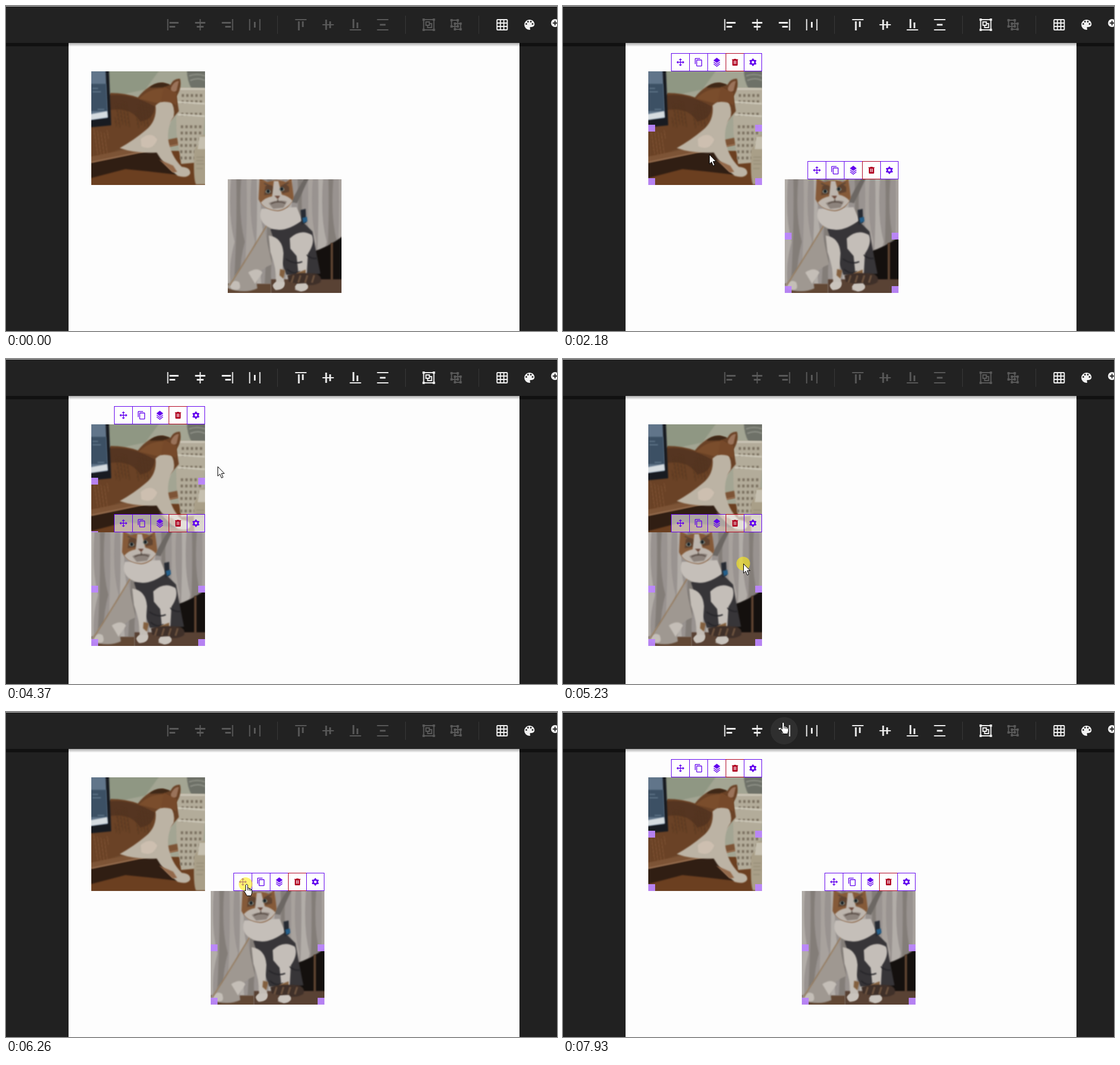
Recreate the animation shown at these times as an HTML page with a canvas. Size 969 by 572 pixels, loop 8000 ms.

```html
<!DOCTYPE html>
<html lang="en">
<head>
<meta charset="utf-8">
<title>Image alignment editor</title>
<style>
html, body { margin: 0; width: 100%; height: 100%; overflow: hidden; background: #212121; }
canvas { display: block; }
</style>
</head>
<body>
<canvas id="stage" width="969" height="572"></canvas>
<script>
const LOOP = 8000, W = 969, H = 572;
const PURPLE = '#6200ee', RED = '#b00020';
const ctx = document.getElementById('stage').getContext('2d');

// ---- icons on a 24 unit grid ----
const alignIcons = [
  'M2 2h2v20h-2zM6 7h16v3h-16zM6 14h10v3h-10z',
  'M11 2h2v5h8v3h-8v4h5v3h-5v5h-2v-5h-5v-3h5v-4h-8v-3h8z',
  'M20 2h2v20h-2zM2 7h16v3h-16zM8 14h10v3h-10z',
  'M2 2h2v20h-2zM20 2h2v20h-2zM10.5 7h3v10h-3z',
  'M2 2h20v2h-20zM7 6h3v16h-3zM14 6h3v10h-3z',
  'M22 11h-5v-5h-3v5h-4v-8h-3v8h-5v2h5v8h3v-8h4v5h3v-5h5z',
  'M2 20h20v2h-20zM7 2h3v16h-3zM14 8h3v10h-3z',
  'M2 2h20v2h-20zM7 10.5h10v3h-10zM2 20h20v2h-20z'
].map(d => new Path2D(d));
const alignX = [293, 341, 389, 437, 518, 566, 614, 662];

const groupIcon = new Path2D('M1 1V5H2V19H1V23H5V22H19V23H23V19H22V5H23V1H19V2H5V1zM5 4H19V5H20V19H19V20H5V19H4V5H5zM6 6V14H9V18H18V9H14V6zM8 8H12V12H8zM14 11H16V16H11V14H14z');
const ungroupIcon = new Path2D('M2 2H6V3H13V2H17V6H16V9H18V8H22V12H21V18H22V22H18V21H12V22H8V18H9V16H6V17H2V13H3V6H2zM18 12V11H16V13H17V17H13V16H11V18H12V19H18V18H19V12zM13 6V5H6V6H5V13H6V14H9V12H8V8H12V9H14V6zM12 12H11V14H13V13H14V11H12z');
const gridIcon = new Path2D('M4 2H20A2 2 0 0 1 22 4V20A2 2 0 0 1 20 22H4A2 2 0 0 1 2 20V4A2 2 0 0 1 4 2z');
for (let i = 0; i < 9; i++) gridIcon.rect(4 + i % 3 * 6, 4 + Math.floor(i / 3) * 6, 4, 4);

const paletteIcon = new Path2D('M12 3a9 9 0 0 0 0 18a1.5 1.5 0 0 0 1.5-1.5c0-.4-.15-.75-.4-1c-.2-.3-.37-.6-.37-1a1.5 1.5 0 0 1 1.5-1.5H16a5 5 0 0 0 5-5c0-4.4-4-8-9-8z');
for (const [x, y] of [[6.5, 10.5], [9.5, 6.5], [14.5, 6.5], [17.5, 10.5]]) addCircle(paletteIcon, x, y, 1.5);

const zoomIcon = new Path2D('M14 15.4l-.8-.8l1.4-1.4l.8.8H16l6 6l-2 2l-6-6zM8 5V8H5V10H8V13H10V10H13V8H10V5z');
addCircle(zoomIcon, 9, 9, 7);

const gearIcon = new Path2D();
for (let i = 0; i < 24; i++) {
  const a = (i - 1.5) * Math.PI / 12 + Math.PI / 6, r = i % 4 === 1 || i % 4 === 2 ? 10 : 7.4;
  gearIcon.lineTo(12 + r * Math.cos(a), 12 + r * Math.sin(a));
}
gearIcon.closePath();
addCircle(gearIcon, 12, 12, 3.5);

const toolIcons = [
  new Path2D('M13 6V11H18V7.75L22.25 12L18 16.25V13H13V18H16.25L12 22.25L7.75 18H11V13H6V16.25L1.75 12L6 7.75V11H11V6H7.75L12 1.75L16.25 6z'),
  new Path2D('M8 5H19a2 2 0 0 1 2 2V21a2 2 0 0 1-2 2H8a2 2 0 0 1-2-2V7a2 2 0 0 1 2-2zM8 7V21H19V7zM16 1H4a2 2 0 0 0-2 2V17H4V3H16z'),
  new Path2D('M12 0L3 7L12 14L21 7zM19.4 10.7L12 16.5L4.6 10.7L3 12L12 19L21 12zM19.4 15.7L12 21.5L4.6 15.7L3 17L12 24L21 17z'),
  new Path2D('M9 3V4H4V6H5V19a2 2 0 0 0 2 2H17a2 2 0 0 0 2-2V6H20V4H15V3zM9 8H11V17H9zM13 8H15V17H13z'),
  gearIcon
];
const arrow = new Path2D('M.5 .5V17L4.3 13.5L7 20.3L9.7 19.1L7 12.5H12z');
const hand = new Path2D('M.5 1.5Q2.2 -1.5 4 1.5V7Q6.3 5.8 6.8 8Q9 7 9.3 9Q11.5 8.5 11.5 11V15Q11 17.5 9.8 20.5H2.5Q1.5 17.5 -2.5 12Q-1 9.5 .5 12z');

function addCircle(path, x, y, r) {
  path.moveTo(x + r, y);
  path.arc(x, y, r, 0, 7);
}
function icon(path, cx, cy, color, size = 24) {
  ctx.save();
  ctx.translate(cx - size / 2, cy - size / 2);
  ctx.scale(size / 24, size / 24);
  ctx.fillStyle = color;
  ctx.fill(path, 'evenodd');
  ctx.restore();
}
function box(color, x, y, w, h) {
  ctx.fillStyle = color;
  ctx.fillRect(x, y, w, h);
}
function disc(color, x, y, r) {
  ctx.fillStyle = color;
  ctx.beginPath();
  ctx.arc(x, y, r, 0, 7);
  ctx.fill();
}

// ---- photos, painted once from soft flat shapes ----
function photo(base, paint) {
  const c = document.createElement('canvas');
  c.width = c.height = 200;
  const g = c.getContext('2d');
  g.fillStyle = base;
  g.fillRect(0, 0, 200, 200);
  g.filter = 'blur(.8px)';
  const fill = (color, d) => { g.fillStyle = color; g.fill(new Path2D(d)); };
  const line = (color, width, d) => {
    g.strokeStyle = color;
    g.lineWidth = width;
    g.stroke(new Path2D(d));
  };
  paint(fill, line);
  return c;
}

const lyingCat = photo('#a3a593', (fill, line) => {
  fill('#8f9783', 'M30 -5H122L95 32L33 45z');
  fill('#6e7168', 'M168 -5H205V30H176Q168 15 168 -5z');
  line('#92948a', 2, 'M172 8Q186 3 200 8M174 16Q188 10 200 16');
  fill('#6b3f20', 'M-5 140H205V205H-5z');
  fill('#301e13', 'M-5 160L125 134L152 182L100 176L60 172L-5 189z');
  fill('#7d5436', 'M-5 149L165 114V127L-5 162z');
  line('#9a7254', 2, 'M0 160L165 126');
  fill('#b3ac9a', 'M148 28L205 30L192 160L158 163L150 110z');
  for (let row = 0; row < 11; row++)
    for (let col = 0; col < 5; col++)
      if (row !== 2 && row !== 4)
        fill('#7c7261', `M${159 + col * 8 - row * .3} ${40 + row * 11}h4v5h-4z`);
  line('#cdc8b9', 3, 'M150 31H200M150 54L200 57M152 76L200 79');
  fill('#6a4226', 'M-5 92L34 38Q60 38 82 46Q100 22 126 20L139 24Q145 12 156 13Q160 28 150 44L154 70L130 98L84 132L-5 151z');
  fill('#553521', 'M33 42Q70 38 112 62Q110 85 86 88Q70 62 33 68z');
  fill('#7a4d2c', 'M84 48Q104 28 132 30L148 42L116 56z');
  fill('#3f2817', 'M102 29Q117 14 139 24L126 28z');
  fill('#9a735a', 'M140 29Q146 16 154 17L150 34L140 40z');
  for (let i = 0; i < 75; i++) {
    const x = 4 + i * 37 % 110, y = (x < 38 ? 102 : 52) + i * 29 % 40;
    line(i % 3 ? '#553621' : '#825637', 1, `M${x} ${y}q3 4 2 9`);
  }
  fill('#bcb3a4', 'M113 60Q124 50 138 50Q148 63 145 80Q134 95 135 118Q139 148 159 168Q175 169 174 180Q169 189 152 184Q126 163 115 143Q78 145 50 135Q75 121 95 104Q116 88 113 60z');
  fill('#cdbfb0', 'M87 119Q105 104 116 120Q108 141 88 132z');
  fill('#94694a', 'M119 155L144 166L151 177L143 178z');
  fill('#76492a', 'M128 28L150 38L150 60Q138 52 122 54z');
  fill('#181b21', 'M-5 -5H31L35 95L-5 99z');
  fill('#61758a', 'M-5 -5H25L29 82L-5 86z');
  fill('#3c5064', 'M-5 22H26L28 70H-5z');
  fill('#d6dce0', 'M-5 76L28 70L29 81L-5 86z');
  line('#819aac', 1, 'M2 30H12M2 36H17M11 67H23');
  fill('#a99f88', 'M181 140Q182 132 190 129V115Q194 111 205 112V199H184Q179 189 181 140z');
  fill('#c6c0b0', 'M190 115H205V137H187z');
  line('#8a816e', 1, 'M185 151H198M185 157H197M185 163H198M185 171H196');
});

const sittingCat = photo('#999390', (fill, line) => {
  for (let i = 0; i < 12; i++) {
    const x = i * 18 - 3;
    fill(['#b2ada8', '#837d78', '#a8a29d'][i % 3], `M${x} -5h9Q${x + 3} 65 ${x + 15} 110Q${x + 4} 150 ${x + 8} 184h-12Q${x + 2} 80 ${x} -5z`);
  }
  fill('#6c6763', 'M111 40L136 -5L144 -5L122 42z');
  fill('#14100e', 'M148 128Q178 119 205 98V182H148z');
  line('#5f4431', 4, 'M183 112V178');
  fill('#594234', 'M76 176H205V205H76z');
  fill('#624835', 'M-5 184H76V205H-5z');
  fill('#9f9891', 'M-5 192L25 154L64 88L78 150Q46 160 52 192Q29 203 -5 190z');
  fill('#c4beb7', 'M4 189Q8 174 20 181Q27 199 7 193zM36 164Q52 153 61 164L48 184z');
  line('#957a5c', 2, 'M70 79Q32 142 3 187');
  fill('#373538', 'M75 88L130 73L149 92L154 120L163 166Q130 172 103 168L85 119z');
  fill('#c5bfb9', 'M59 52Q51 75 75 86Q100 96 131 72L121 49z');
  fill('#c4beb7', 'M72 99Q96 102 98 130L96 160L100 183Q99 195 83 193Q77 189 85 180Q86 157 75 128z');
  fill('#c4beb8', 'M109 104Q128 86 148 98Q154 112 141 131L139 166L141 191Q132 201 118 194L125 174L121 135L110 122z');
  line('#252428', 2, 'M102 140Q117 151 131 145M139 133Q147 141 157 139M104 158Q116 169 127 162');
  fill('#83603f', 'M92 158L101 160L98 175L91 169zM121 165L137 159L137 175L121 177z');
  fill('#3f3029', 'M105 169Q122 163 154 166Q167 170 163 181Q149 192 107 180z');
  for (let i = 0; i < 4; i++) line('#705540', 3, `M${116 + i * 12} 169l-4 13`);
  fill('#c9c3bc', 'M79 187Q83 178 99 181Q102 194 84 195zM118 190Q120 182 138 183Q146 195 128 197z');
  fill('#855a39', 'M56 -2L70 5Q88 -2 102 5L112 -2L116 32Q108 54 88 56Q63 54 54 35z');
  fill('#5f4330', 'M66 12Q78 6 83 18L80 26L64 28zM93 12Q102 5 108 14L108 22L96 25z');
  fill('#bdb5ad', 'M81 3H89L95 27Q108 30 114 38Q104 53 88 55Q66 54 58 41Q66 32 78 30z');
  fill('#8d837c', 'M72 42Q88 35 104 39L98 50L80 52z');
  fill('#6d4a3c', 'M82 29H92L88 35z');
  line('#4d4039', 1.5, 'M88 35V40M76 43Q88 37 101 42M64 7L72 11M99 10L107 6');
  for (const [x, y] of [[71, 22], [95, 18]]) {
    fill('#8b9388', `M${x - 5} ${y}q5 -8 10 0q-5 6 -10 0z`);
    fill('#171c20', `M${x - 3} ${y - 1}q3 -7 6 0q-3 7 -6 0z`);
  }
  fill('#272b33', 'M128 54L137 52L138 76L130 80z');
  fill('#245e89', 'M131 68L139 66L140 74L133 77z');
});

// ---- motion: time, x, y of the pointer ----
const track = [
  [210, 818, 560], [520, 660, 476], [850, 500, 440], [1150, 500, 440], [1700, 248, 248],
  [2030, 248, 248], [2180, 257, 261], [2380, 257, 261], [2750, 364, 70], [3050, 273, 36],
  [3300, 273, 36], [3370, 277, 36], [3440, 277, 36], [3510, 281, 36], [4210, 281, 36],
  [4530, 461, 340], [4900, 461, 340], [5150, 317, 360], [5310, 317, 360], [5550, 211, 293],
  [5630, 211, 293], [5950, 301, 253], [6260, 421, 303], [6420, 481, 303], [6480, 481, 303],
  [7050, 267, 219], [7390, 267, 219], [7900, 385, 18]
];
const presses = [[900, 1150], [1780, 1950], [3660, 3830], [4750, 4910], [5200, 5320], [5610, 6490], [7200, 7370]];
const within = (t, a, b) => t >= a && t < b;

function pointerAt(t) {
  const i = track.findIndex(k => k[0] > t);
  if (i < 0) return track[track.length - 1].slice(1);
  const [t0, x0, y0] = track[i - 1], [t1, x1, y1] = track[i];
  const u = (t - t0) / (t1 - t0);
  return [x0 + (x1 - x0) * u, y0 + (y1 - y0) * u];
}
function catAt(t, px, py) {
  if (t < 3830) return [390, 305];
  if (t < 5630) return [150, 305];
  if (t >= 6420) return [420, 315];
  const snap = v => Math.round(v / 10) * 10;
  return [150 + snap(px - 211), 305 + snap(py - 293)];
}

// ---- drawing ----
function handles(x, y) {
  for (const dy of [94, 188])
    for (const dx of [0, 188]) box('rgba(187,134,252,.95)', x + dx, y + dy, 12, 12);
}
function tools(x, y) {
  x += 40;
  y -= 32;
  box('rgba(255,255,255,.6)', x, y, 160, 32);
  toolIcons.forEach((path, i) => {
    const color = i === 3 ? RED : PURPLE, left = x + i * 32;
    box(color, left, y, 32, 1);
    box(color, left, y + 31, 32, 1);
    box(color, left, y, 1, 32);
    icon(path, left + (i < 4 ? 16.5 : 16), y + 16, color, 16);
  });
  box(PURPLE, x + 159, y, 1, 32);
}
function topBar(active, hover) {
  box('#222', 0, 0, W, 65);
  box('#bdbdbd', 0, 0, W, 1);
  if (hover) disc('rgba(255,255,255,.06)', hover, 33, 24);
  const color = active ? '#eee' : '#595959', barIcon = (path, x, c) => icon(path, x + .5, 33, c);
  alignIcons.forEach((path, i) => barIcon(path, alignX[i], color));
  for (const x of [477, 702, 831]) box('#383838', x, 17, 1, 32);
  barIcon(groupIcon, 743, color);
  barIcon(ungroupIcon, 791, '#595959');
  barIcon(gridIcon, 872, '#f2f2f2');
  barIcon(paletteIcon, 920, '#f2f2f2');
  barIcon(zoomIcon, 968, '#f2f2f2');
}
function page() {
  box('#212121', 0, 0, W, H);
  box('#111', 0, 65, W, 6);
  box('#fdfdfd', 110, 65, 793, 507);
  const shade = ctx.createLinearGradient(0, 65, 0, 71);
  shade.addColorStop(0, 'rgba(0,0,0,.32)');
  shade.addColorStop(1, 'rgba(0,0,0,.03)');
  box(shade, 110, 65, 793, 6);
}
function cursor(x, y, pointing) {
  ctx.save();
  ctx.translate(Math.round(x), Math.round(y));
  ctx.fillStyle = '#fff';
  ctx.strokeStyle = '#000';
  ctx.lineWidth = 1;
  ctx.lineJoin = 'round';
  const shape = pointing ? hand : arrow;
  ctx.fill(shape);
  ctx.stroke(shape);
  if (pointing) ctx.stroke(new Path2D('M4 7V11M6.8 8V11.5M9.3 9V12'));
  ctx.restore();
}

function draw(t) {
  const shown = t >= 210;
  const [px, py] = shown ? pointerAt(t) : [-99, -99];
  const [cx, cy] = catAt(t, px, py);
  const first = within(t, 1780, 4830) || t >= 7120;
  const firstTools = within(t, 1780, 4830) || t >= 7200;
  const second = within(t, 910, 4830) || t >= 5200;
  const overTools = (on, x, y) => on && px > x + 40 && px < x + 200 && py > y - 32 && py < y;
  const hover = firstTools && alignX.find(x => Math.hypot(px - x, py - 33) < 24);

  page();
  ctx.drawImage(lyingCat, 150, 115);
  if (first) handles(150, 115);
  if (firstTools) tools(150, 115);
  ctx.drawImage(sittingCat, cx, cy);
  if (second) {
    handles(cx, cy);
    tools(cx, cy);
  }
  topBar(firstTools, hover);

  if (!shown) return;
  if (presses.some(([a, b]) => within(t, a, b))) disc('rgba(255,236,20,.6)', px, py, 12);
  cursor(px, py, hover || overTools(firstTools, 150, 115) || overTools(second, cx, cy));
}

function tick() {
  draw(performance.now() % LOOP);
  requestAnimationFrame(tick);
}
tick();
</script>
</body>
</html>
```
